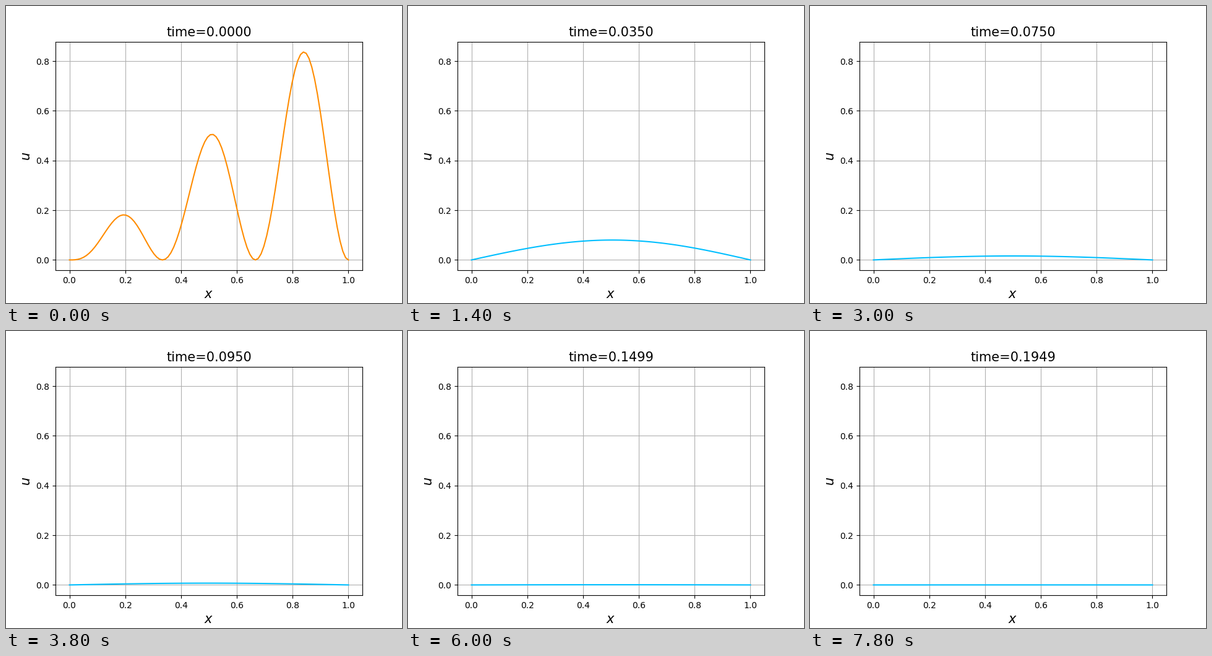
A matplotlib script for the animation above (8 s loop, 640 by 480 pixels).

```python
import numpy as np
import matplotlib.pyplot as plt
from matplotlib.animation import FuncAnimation

FRAMES, INTERVAL = 40, 200
STEP = 0.0049982          # simulated time per frame
POINTS, DX, DIFFUSIVITY = 100, 0.01, 4.0

# Heat equation with fixed ends, solved in the sine modes of the grid
x = np.linspace(0, 1, POINTS)
u0 = x * np.sin(3 * np.pi * x) ** 2
n = np.arange(1, POINTS - 1)
modes = np.sin(np.pi * np.outer(x, n))
coeffs = 2 / (POINTS - 1) * modes.T @ u0
rates = DIFFUSIVITY * (2 / DX * np.sin(n * np.pi / (2 * (POINTS - 1)))) ** 2


def solution(t):
    return modes @ (coeffs * np.exp(-rates * t))


fig, ax = plt.subplots(figsize=(6.4, 4.8), dpi=100)
line, = ax.plot(x, u0, color="darkorange")
title = ax.set_title("time=0.0000", fontsize=15)
ax.set_xlabel("$x$", fontsize=15)
ax.set_ylabel("$u$", fontsize=15)
ax.grid(True)
ax.set_xlim(ax.get_xlim())
ax.set_ylim(ax.get_ylim())


def update(i):
    t = i * STEP
    line.set_ydata(solution(t) if i else u0)
    line.set_color("deepskyblue" if i else "darkorange")
    title.set_text(f"time={t:.4f}")
    return line, title


anim = FuncAnimation(fig, update, frames=FRAMES, interval=INTERVAL,
                     repeat=True, repeat_delay=0, blit=False)
plt.show()
```
